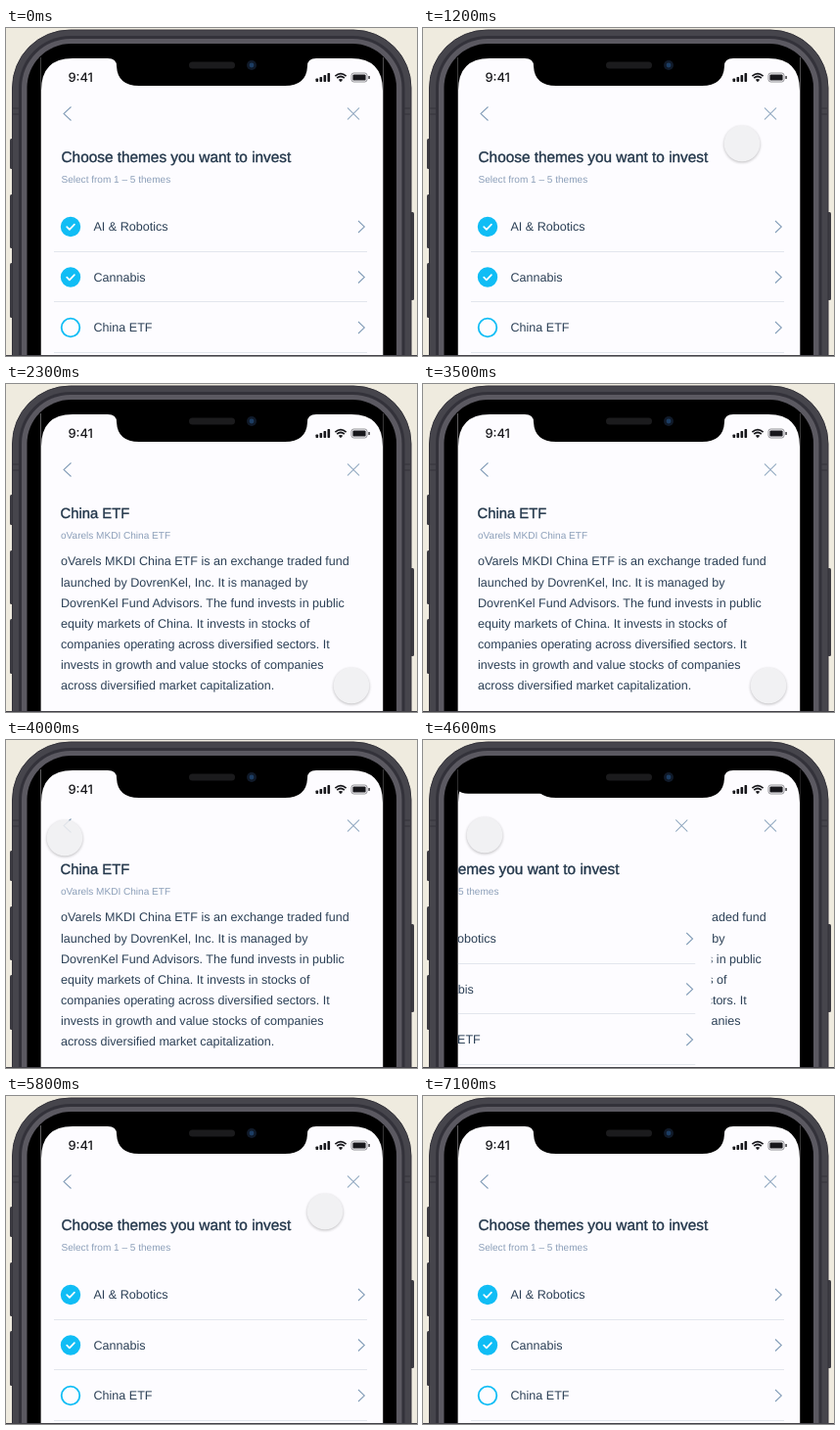
An HTML page for the animation above (7200 ms loop, 420 px wide and 335 px high).

```html
<!DOCTYPE html>
<html lang="en">
<head>
<meta charset="utf-8">
<title>Theme picker</title>
<style>
  html, body { margin: 0; width: 100%; height: 100%; overflow: hidden; background: #efebdf; }
  svg { display: block; width: 420px; height: 335px; }
  text { font: 12.55px "Liberation Sans", Arial, sans-serif; fill: #2c4056; text-rendering: geometricPrecision; }
  .title { font-size: 15.37px; fill: #22364a; stroke: #22364a; stroke-width: .35; }
  .sub { font-size: 10.05px; fill: #8c9fb9; }
  .clock { font: 500 12.9px Inter, sans-serif; fill: #17171b; }
  .icon { fill: none; stroke: #839db8; stroke-width: 1.05; }
  .rule { stroke: #e2e6ed; }
  .tick { fill: none; stroke: #fff; stroke-width: 1.7; stroke-linecap: round; stroke-linejoin: round; }
  #touch { filter: drop-shadow(0 1.5px 1.8px rgba(0, 0, 0, .3)); }
</style>
</head>
<body>
<svg viewBox="0 0 420 335">
  <defs>
    <clipPath id="screen"><rect x="35.5" y="30" width="350" height="305"/></clipPath>
    <g id="base">
      <rect x="35" width="350.5" height="335" fill="#fdfcff"/>
      <path d="M122 28V40Q122 54.7 137 54.7H284Q299 54.7 299 40V28Z"/>
      <text class="clock" x="63.4" y="55">9:41</text>
      <g fill="#17171b">
        <rect x="316.5" y="51.5" width="2.6" height="3.5" rx=".7"/>
        <rect x="320.5" y="50" width="2.6" height="5" rx=".7"/>
        <rect x="324.5" y="48" width="2.6" height="7" rx=".7"/>
        <rect x="328.5" y="46" width="2.6" height="9" rx=".7"/>
        <rect x="354.4" y="47.4" width="13.2" height="6.2" rx="1.2"/>
        <rect x="370.4" y="49" width="1.3" height="3" rx=".6"/>
        <path d="M342 55.2L339.8 52.8Q342 51 344.2 52.8Z"/>
      </g>
      <path d="M336.4 49.2Q342 44.2 347.6 49.2M338.2 51.2Q342 47.8 345.8 51.2" fill="none" stroke="#17171b" stroke-width="1.7"/>
      <rect x="353" y="46" width="16" height="9" rx="2.4" fill="none" stroke="#77777b" stroke-width=".8"/>
      <path class="icon" d="M66.5 80.5L59 87.5L66.5 94.5M349 81.5L361 93.5M361 81.5L349 93.5"/>
    </g>
  </defs>

  <g fill="#3b3a41">
    <rect x="4" y="113" width="4" height="31" rx="1.5"/>
    <rect x="4" y="170" width="4" height="55" rx="1.5"/>
    <rect x="4" y="240" width="4" height="56" rx="1.5"/>
    <rect x="413" y="188" width="4" height="90" rx="1.5"/>
  </g>
  <rect x="6.5" y="2" width="407.5" height="420" rx="59" fill="#46454c" stroke="#34333a"/>
  <path d="M7 82H16M7 88H16M404 82H413M404 88H413" stroke="#34333a"/>
  <rect x="13" y="8" width="394.5" height="410" rx="53" fill="#33323a"/>
  <rect x="16" y="11" width="388.5" height="410" rx="50" fill="#5b5961"/>
  <rect x="21.5" y="16" width="377.5" height="400" rx="45"/>

  <g clip-path="url(#screen)">
    <g id="pages">
      <g id="list">
        <use href="#base"/>
        <text class="title" x="56.5" y="137">Choose themes you want to invest</text>
        <text class="sub" x="56.5" y="158">Select from 1 – 5 themes</text>
      </g>
      <g id="detail">
        <use href="#base"/>
        <text class="title" x="55.5" y="137" style="font-size:14.8px">China ETF</text>
        <text class="sub" x="56" y="158">oVarels MKDI China ETF</text>
      </g>
    </g>
    <!-- bezel with a screen-shaped hole -->
    <path fill-rule="evenodd" d="M30 25H392V345H30Z
      M36 340V64Q36 31 68 31H104Q113 31 113 39Q114 59 136 59H285Q307 59 308 39Q308 31 317 31H353Q385 31 385 64V340Z"/>
  </g>
  <rect x="187" y="34.5" width="47" height="7" rx="3.5" fill="#1b1b1d"/>
  <circle cx="251" cy="38" r="5" fill="#101a29"/>
  <circle cx="251" cy="38" r="2.4" fill="#1c3d63"/>
  <circle id="touch" r="18.3" fill="#f0f0f2"/>
  <path d="M0 334.5H420" stroke="#444349"/>
</svg>
<script>
const $ = id => document.getElementById(id);
const pages = $('pages'), list = $('list'), detail = $('detail'), touch = $('touch');
const LOOP = 7200, STEP = 100, WIDTH = 350;

const add = (group, html) => group.insertAdjacentHTML('beforeend', html);

['AI &amp; Robotics', 'Cannabis', 'China ETF'].forEach((name, i) => {
  const y = 203 + i * 51.5, on = i < 2;
  add(list, `
    <circle cx="66" cy="${y}" r="9.3" fill="${on ? '#10bdf5' : 'none'}" stroke="#10bdf5" stroke-width="1.8"/>
    ${on ? `<path class="tick" d="M62.2 ${y + .2}l2.7 2.7l5 -5.2"/>` : ''}
    <text x="89.5" y="${y + 4.2}">${name}</text>
    <path class="icon" d="M360 ${y - 6}l6.3 6l-6.3 6"/>
    <path class="rule" d="M49 ${Math.floor(y + 25) + .5}H369"/>`);
});

[
  'oVarels MKDI China ETF is an exchange traded fund',
  'launched by DovrenKel, Inc. It is managed by',
  'DovrenKel Fund Advisors. The fund invests in public',
  'equity markets of China. It invests in stocks of',
  'companies operating across diversified sectors. It',
  'invests in growth and value stocks of companies',
  'across diversified market capitalization.'
].forEach((line, i) => add(detail, `<text x="56" y="${185.4 + i * 21.15}">${line}</text>`));

// Smoothstep progress of t between a and b
function ease(t, a, b) {
  const p = Math.min(1, Math.max(0, (t - a) / (b - a)));
  return p * p * (3 - 2 * p);
}

// Touch stops: start and end of the move, then where it arrives
const stops = [
  [1400, 1900, 353, 308],
  [3500, 4000, 60, 100],
  [4000, 4300, 63, 97],
  [5540, 5800, 326, 118]
];

function draw(t) {
  const back = t >= 4400;
  const top = back ? list : detail;
  if (pages.lastElementChild !== top) pages.append(top);
  const into = WIDTH * (1 - ease(t, 2000, 2300));
  const out = back ? -WIDTH * (1 - ease(t, 4400, 4700)) : 0;
  detail.setAttribute('transform', `translate(${back ? 0 : into})`);
  list.setAttribute('transform', `translate(${out})`);

  let x = 326, y = 118;
  for (const [a, b, toX, toY] of stops) {
    const p = ease(t, a, b);
    x += (toX - x) * p;
    y += (toY - y) * p;
  }
  touch.setAttribute('transform', `translate(${x} ${y})`);
  touch.setAttribute('opacity', .86 * (ease(t, 900, 1200) - ease(t, 5850, 6150)));
}

function tick() {
  draw(Math.floor(performance.now() % LOOP / STEP) * STEP);
  requestAnimationFrame(tick);
}
tick();
</script>
</body>
</html>
```
